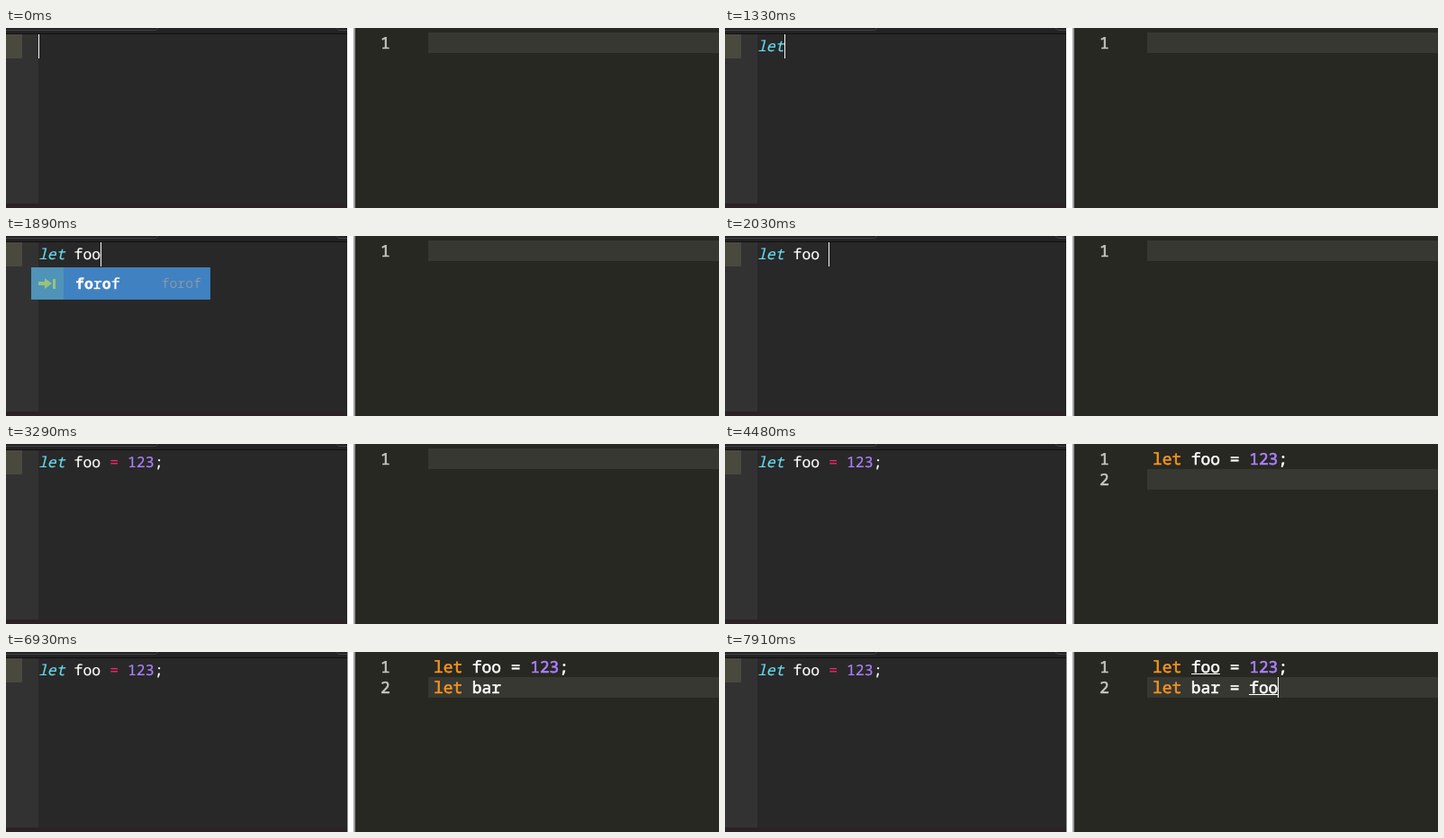
These frames come from a looping animation (792 by 201 pixels, 8 s). An HTML page:

```html
<!DOCTYPE html>
<html lang="en">
<meta charset="utf-8">
<title>Two editors</title>
<style>
html, body { margin: 0; width: 100%; height: 100%; overflow: hidden; background: #272822 }
svg { display: block }
text {
  font: 16.5px "Noto Sans Mono", "DejaVu Sans Mono", monospace;
  white-space: pre; text-rendering: geometricPrecision;
  color: #fff; fill: currentColor; stroke: currentColor; stroke-width: .15px;
}
tspan { fill: currentColor; stroke: currentColor }
.right { font-size: 17.87px; stroke-width: .6px }
.number { color: #c8c8c2 }
.label { stroke-width: .35px }
.hint { font-size: 14.8px; text-anchor: end; color: #505254; stroke: none }
.selected { color: #8798a8 }
.hit { font-weight: 700 }
.cyan { color: #66d9ef; font-style: italic }
.pink { color: #f92672; stroke: none }
.orange { color: #f7941e }
.purple { color: #ae81ff }
</style>
<svg width="792" height="201" viewBox="0 0 792 201">
  <rect width="379" height="201" fill="#282828"/>
  <rect y="7" width="36" height="194" fill="#323232"/>
  <rect y="7" width="18" height="27" fill="#49493e"/>
  <rect width="379" height="6" fill="#232323"/>
  <path d="M0 2.5H166L169 0M367 0L370 2.5H379" fill="none" stroke="#414141"/>
  <rect y="6" width="379" height="1" fill="#111"/>
  <rect y="196" width="379" height="5" fill="#2a2325"/>
  <rect x="379" width="7" height="201" fill="#fff"/>
  <rect x="386" width="2" height="201" fill="#999"/>
  <rect x="388" width="404" height="201" fill="#272822"/>
  <g id="scene"></g>
</svg>
<script>
const LOOP = 8000, SAVED = 3360, FOCUS = 4970, HIGHLIGHT = 7910;
const FIRST_LINE = "let foo = 123;";
const SNIPPETS = ["for", "forof", "function", "forea", "forin"];

// Bursts of typing: start, characters, pause between keys. Empty ones restart the caret.
const left = {
  x: 35.95, y: 7, step: 9.9, height: 27, blink: 350,
  bursts: [[-70, ""], [1190, "let "], [1540, "foo", 140], [2030, " "],
    [2380, "= "], [2660, "123"], [2940, ";"], [3430, ""]]
};
const right = {
  x: 475, y: 28, step: 10.72, height: 23, blink: 420,
  bursts: [[5040, ""], [5670, "let ", 46], [6230, "bar "], [7070, "= "], [7560, "foo", 140]]
};

function typed(pane, t) {
  let code = "", last = -Infinity;
  for (const [start, chars, gap = 70] of pane.bursts) {
    if (t < start) break;
    const n = Math.min(chars.length, 1 + Math.floor((t - start) / gap));
    code += chars.slice(0, n);
    last = start + Math.max(0, n - 1) * gap;
  }
  return { code, lit: Math.floor((t - last) / pane.blink) % 2 === 0 };
}

const rect = (x, y, w, h, fill) => `<rect x="${x}" y="${y}" width="${w}" height="${h}" fill="${fill}"/>`;
const text = (x, y, body, style = "") => `<text x="${x}" y="${y}" class="${style}">${body}</text>`;
const span = (body, style) => `<tspan class="${style}">${body}</tspan>`;
const caret = (pane, n) => rect(Math.round(pane.x + n * pane.step), pane.y, 1, pane.height, "#f8f8f2");
const underline = (col, y) => rect(Math.round(right.x + col * right.step), y, 32, 1, "#fff");

const paint = (code, keyword, operator) => code.replace(/let|=|\d+/g, word =>
  span(word, word === "let" ? keyword : word === "=" ? operator : "purple"));

// Bolds the letters of word that match query in order.
function mark(word, query) {
  let i = 0;
  return [...word].map(c => c === query[i] ? (i++, span(c, "hit")) : c).join("");
}

function row(word, i, width, query) {
  const y = 35 + 36 * i, mid = y + 18, selected = i === 0;
  return rect(28, y, 36, 36, selected ? "#5093b8" : "#394433") +
    rect(64, y, width - 36, 36, selected ? "#4081c1" : "#1f2022") +
    `<path d="M36 ${mid - 2}h7v-4l8 6l-8 6v-4h-7zM52 ${mid - 5}h3v11h-3z" fill="#98c379"/>` +
    text(77, y + 24, mark(word, query), "label") +
    text(18 + width, y + 23, word, selected ? "hint selected" : "hint");
}

function popup(query) {
  const match = new RegExp([...query].join(".*"));
  const words = SNIPPETS.filter(word => match.test(word));
  const width = 159 + 8 * Math.max(...words.map(word => word.length));
  return words.map((word, i) => row(word, i, width, query)).join("");
}

function leftPane(t) {
  const { code, lit } = typed(left, t);
  let out = text(left.x, 26, paint(code, "cyan", "pink"));
  if (lit && t < FOCUS) out += caret(left, code.length);
  // The list lags one key pause behind the typed word.
  if (/^let fo+$/.test(code)) out += popup(typed(left, t - 70).code.slice(4));
  return out;
}

function rightPane(t) {
  const saved = t >= SAVED, { code, lit } = typed(right, t);
  let out = rect(469, saved ? 28 : 5, 323, 23, "#373832") + text(416, 23, 1, "right number");
  if (t >= FOCUS) out += rect(379, 0, 1, 201, "#a0a0a0");
  if (saved) out += text(416, 46, 2, "right number") +
    text(right.x, 23, paint(FIRST_LINE, "orange", ""), "right") +
    text(right.x, 46, paint(code, code.length > 4 ? "orange" : "", ""), "right");
  if (lit) out += caret(right, code.length);
  if (t >= HIGHLIGHT) out += underline(4, 24) + underline(10, 47);
  return out;
}

const scene = document.getElementById("scene");
const start = performance.now();
let last;
function draw() {
  const t = (performance.now() - start) % LOOP;
  const markup = leftPane(t) + rightPane(t);
  if (markup !== last) scene.innerHTML = last = markup;
  requestAnimationFrame(draw);
}
draw();
</script>
</html>
```
